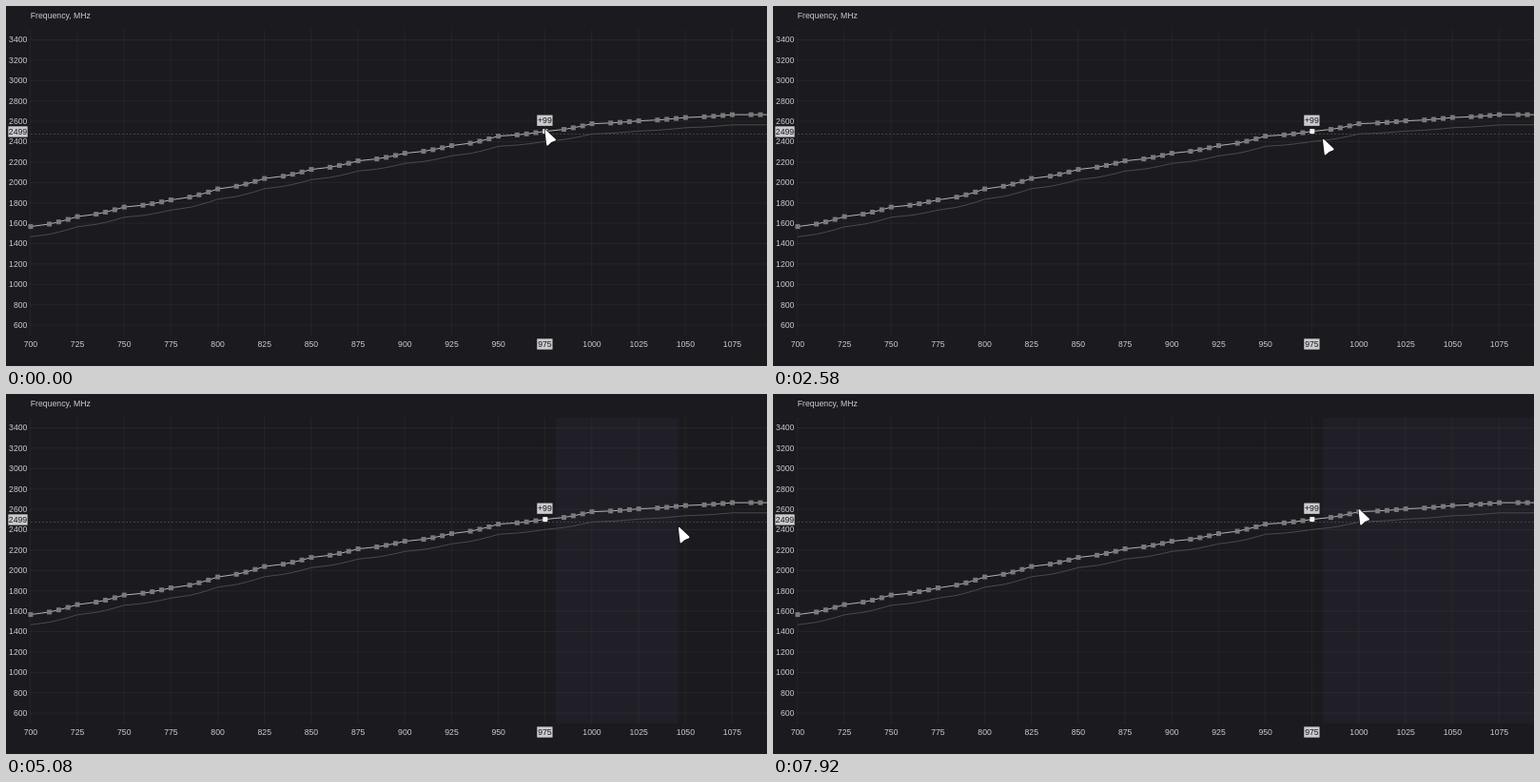
An HTML page for the animation above (8 s loop, 800 by 378 pixels).

```html
<!DOCTYPE html>
<html lang="en">
<head>
<meta charset="utf-8">
<title>Frequency curve</title>
<style>
html, body { margin: 0; width: 100%; height: 100%; overflow: hidden; background: #1b1a1e; }
svg { display: block; width: 100vw; height: 100vh; }
text { font: 8.7px "Liberation Sans", Arial, sans-serif; fill: #c9ccd4; }
.tag text { fill: #1b1a1e; }
</style>
</head>
<body>
<svg id="stage" viewBox="0 0 800 378"></svg>
<script>
const LOOP = 8000, FRAME = 1000 / 12;
const DRAG_START = 4400, DRAG_END = 5680, ANCHOR = 578;
const stage = document.getElementById('stage');
const px = v => 25.7 + (v - 700) * 1.967;
const py = f => 35.5 + (3400 - f) * 0.107;

function add(tag, attrs, parent = stage) {
  const el = document.createElementNS('http://www.w3.org/2000/svg', tag);
  for (const k in attrs) el.setAttribute(k, attrs[k]);
  parent.appendChild(el);
  return el;
}

function label(s, x, y, anchor, parent) {
  add('text', { x, y, 'text-anchor': anchor }, parent).textContent = s;
}

function tag(s, x, y, w, h = 11.3) {
  const g = add('g', { class: 'tag' });
  add('rect', { x: x - w / 2, y: y - h / 2, width: w, height: h, fill: '#cbcacd' }, g);
  label(s, x, y + 3, 'middle', g);
}

add('rect', { width: 800, height: 378, fill: '#1b1a1e' });
const selection = add('rect', { x: ANCHOR, y: 25, width: 0, height: 321, fill: '#201e26' });

// Grid and axis labels
label('Frequency, MHz', 25.8, 13.4, 'start');
let grid = '';
for (let f = 600; f <= 3400; f += 200) {
  grid += `M25 ${py(f)}H800`;
  label(f, 22.4, py(f) + 2.9, 'end');
}
for (let v = 700; v <= 1075; v += 25) {
  grid += `M${px(v)} 25V346`;
  if (v !== 975) label(v, px(v) + 0.2, 358, 'middle');
}
add('path', { d: grid, stroke: '#fff', 'stroke-opacity': 0.047, fill: 'none' });
add('path', { d: 'M26 134.5H800', stroke: '#424145', 'stroke-dasharray': '2 2' });

// Curve height at each grid column; it steepens towards the next one
const knots = [232, 221.5, 211.5, 204, 192.5, 181.5, 172, 163, 155, 147, 137, 132, 124, 121, 117.5, 114.5, 114.5];

function height(v) {
  const i = Math.floor((v - 700) / 25), u = (v % 25) / 25;
  return knots[i] + (knots[i + 1] - knots[i]) * u ** 1.5 - 0.4;
}

const points = [];
for (let v = 700; v <= 1090; v += 5) {
  if (v % 25 !== 5) points.push({ v, x: px(v) + 0.2, y: height(v) });
}

const trace = dy => 'M' + points.map(p => `${p.x} ${p.y + dy}`).join('L') + 'H800';
add('path', { d: trace(10.7), stroke: '#4a494d', fill: 'none' });
add('path', { d: trace(0), stroke: '#b4b4b6', fill: 'none' });
for (const { v, x, y } of points) {
  add('rect', {
    x: x - 2.5, y: y - 2.5, width: 5, height: 5,
    fill: v === 975 ? '#f2f2f2' : '#7a7a7c'
  });
}

tag('2499', 12.5, 132, 20.3);
tag('975', 566.4, 355, 16.3);
tag('+99', 566.4, 120.2, 16.3);

const cursor = add('path', {
  d: 'M0 1Q.1-.7 1.4.4L11.2 9.8Q12.3 11.2 10.7 11.6Q6.5 12.4 3.6 16Q2.1 17.6 1.7 15.6Z',
  fill: '#fff', stroke: '#101012', 'stroke-width': 1.4, 'paint-order': 'stroke', 'stroke-linejoin': 'round'
});

// Pointer moves: start time, end time, x, y
const moves = [
  [0, 0, 566.5, 130],
  [700, 1400, 580.5, 134.3],
  [1700, 2300, ANCHOR, 139.8],
  [DRAG_START, DRAG_END, 812, 139.8],
  [6150, 6700, 700, 128],
  [7000, 7700, 615.5, 121]
];
const ease = u => u * u * (3 - 2 * u);

function pointer(t) {
  let [, , x, y] = moves[0];
  for (const [from, to, x1, y1] of moves.slice(1)) {
    const k = ease(Math.min(1, Math.max(0, (t - from) / (to - from))));
    x += (x1 - x) * k;
    y += (y1 - y) * k;
  }
  return [x, y];
}

function draw(ms) {
  const t = Math.floor(((ms + 5) % LOOP) / FRAME) * FRAME;
  const [x, y] = pointer(t);
  const right = t < DRAG_START ? ANCHOR : t < DRAG_END ? Math.min(800, x) : 800;
  selection.setAttribute('width', Math.max(0, right - ANCHOR));
  cursor.setAttribute('transform', `translate(${x.toFixed(1)} ${y.toFixed(1)})`);
}

const start = performance.now();
function tick() {
  draw(performance.now() - start);
  requestAnimationFrame(tick);
}
tick();
</script>
</body>
</html>
```
